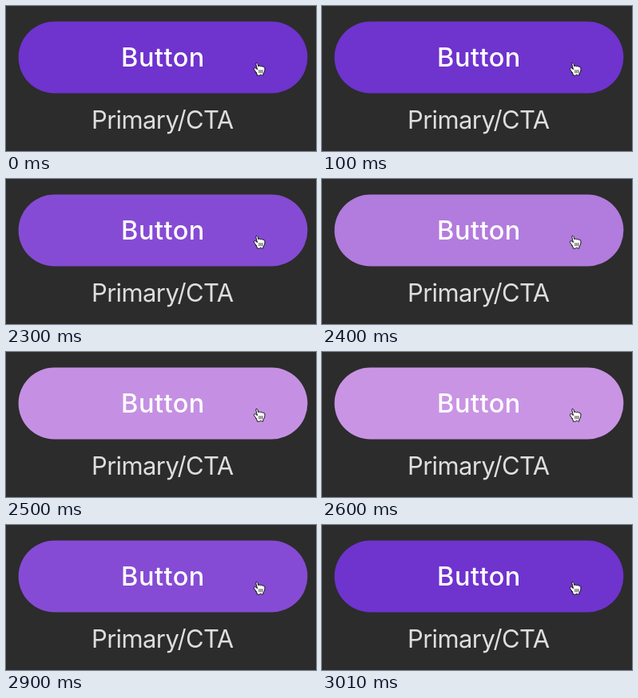
These frames come from a looping animation (388x182 px, 3120 ms). An HTML page:

```html
<!DOCTYPE html>
<html lang="en">
<head>
<meta charset="utf-8">
<title>Button hover</title>
<style>
html, body { margin: 0; width: 100%; height: 100%; overflow: hidden; background: #2c2c2c; }
svg { display: block; }
text { font-family: Inter, sans-serif; }
</style>
</head>
<body>
<svg width="388" height="182" viewBox="0 0 388 182">
  <rect id="pill" x="15.6" y="19.6" width="361.8" height="89.8" rx="44.9"/>
  <text x="144.1" y="76" font-size="32.5" font-weight="500" letter-spacing=".5" fill="#fff">Button</text>
  <text x="107" y="154" font-size="31" letter-spacing="-.6" fill="#dedede">Primary/CTA</text>
  <g transform="translate(301.9 63.2)" fill="#fff" stroke="#000" stroke-width=".9" stroke-linejoin="round" stroke-linecap="round">
    <path d="M11.3 20.4 L8.6 16.5 Q8 14.5 9.9 14.4 Q10.8 14.6 12.6 16.5 L11 10 Q10.6 8 12 8 Q13.2 8.2 14 12.6 Q14.3 11.6 15.4 11.8 Q16.3 12 16.7 12.9 Q17.2 12 18.4 12.2 Q19.3 12.4 19.7 13.4 Q20 12.9 21 13 Q22 13.4 22 15 V17 Q21.8 19 21 20.2 Q19.7 21.6 19.7 24 H18.5 L17.2 23 Q16.4 22.8 15.3 24 H12.5 Q12.7 22 11.3 20.4 Z"/>
    <path d="M15 17.3 V20.7 M17 17.3 V20.7 M19 17.3 V20.7" stroke-width=".75"/>
  </g>
</svg>
<script>
const LOOP = 3120;
const rest = [111, 51, 206], hover = [201, 148, 228];
// [start in ms, amount of hover colour]
const steps = [[0, 0], [2300, .25], [2400, .74], [2500, .96], [2600, 1], [2800, .74], [2900, .25], [3010, 0]];
const pill = document.getElementById('pill');

function draw(now) {
  const t = now % LOOP;
  const mix = steps.findLast(([start]) => start <= t)[1];
  const rgb = rest.map((c, i) => Math.round(c + (hover[i] - c) * mix));
  pill.setAttribute('fill', `rgb(${rgb})`);
}

const origin = performance.now();
function tick() {
  draw(performance.now() - origin);
  requestAnimationFrame(tick);
}
tick();
</script>
</body>
</html>
```
